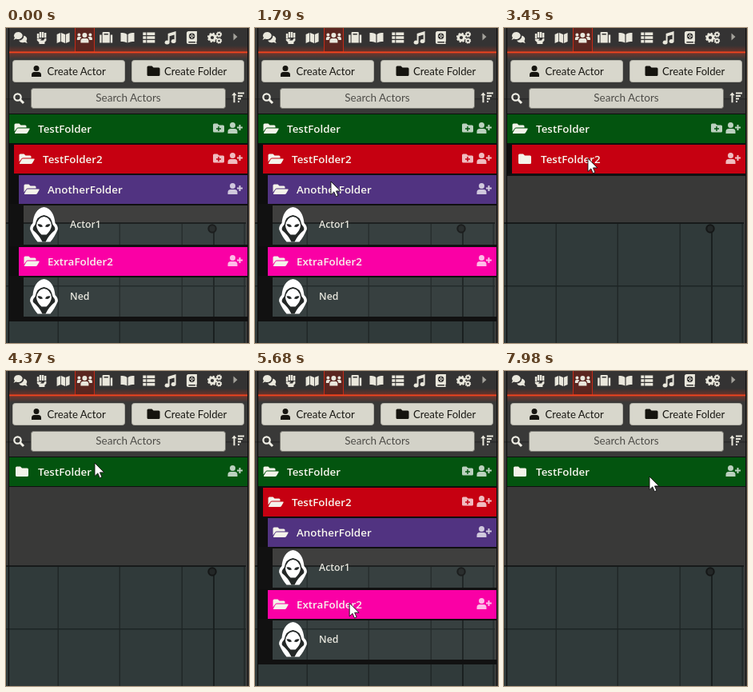
These frames come from a looping animation (304x394 px, 8 s). An HTML page:

```html
<!DOCTYPE html>
<html lang="en">
<head>
<meta charset="utf-8">
<title>Folder tree</title>
<style>
html, body { margin: 0; width: 100%; height: 100%; overflow: hidden; background: #383838; }
svg { display: block; width: 304px; height: 394px; }
text { font: 400 13.5px Lato, "Open Sans", sans-serif; fill: #191813; }
.folder { font: 600 13.4px "Open Sans", "Noto Sans", sans-serif; fill: #f7f6ee; }
.actor { font: 600 12.3px "Open Sans", "Noto Sans", sans-serif; fill: #e6e5dc; }
.lit { filter: drop-shadow(0 0 3px #ff2a12); }
path { fill-rule: evenodd; }
</style>
</head>
<body>
<svg viewBox="0 0 304 394">
  <defs>
    <linearGradient id="glow" x2="0" y2="1">
      <stop offset="0" stop-color="#ff3010" stop-opacity="0"/>
      <stop offset=".5" stop-color="#ff3010" stop-opacity=".3"/>
      <stop offset="1" stop-color="#ff3010" stop-opacity="0"/>
    </linearGradient>
  </defs>
  <g id="scene"></g>
  <g id="panel"></g>
  <g id="sort" transform="translate(290 87)" fill="#e9e7dc">
    <path d="M-4.5-6.5l3.2 3.7h-2.2v9h-2v-9h-2.2zM0-6.5h8v2H0zM0-3h6v2H0zM0 .5h4v2H0zM0 4h2v2H0z"/>
  </g>
  <g id="tree"></g>
  <path id="arrow" d="M0 0v16.5l3.8-3.6 2.5 5.8 2.7-1.1-2.5-5.7h5.3z" fill="#fff" stroke="#111" stroke-width=".9"/>
  <g id="hand" fill="#fff" stroke="#111">
    <path d="M-2 2q0-2 2-2t2 2v5.5q3.3-1 3.6 1 3-.5 3 2v5.5q0 2-1.6 4v2h-8.5v-2l-5-7.5q-1.5-2 .8-2.5 1.7 0 3.7 2.5z"/>
    <path d="M2 7.5v4.5M5.6 8.5v4" fill="none"/>
  </g>
</svg>
<script>
const LOOP = 8000;
const $ = id => document.getElementById(id);

const icons = {
  chat: 'M-2.5-7a5.5 4.5 0 1 1-3 8.4L-8.5 3l1.4-3A5.5 4.5 0 0 1-2.5-7zM4.3-2.5a5 4.3 0 0 1 3.1 6.7L8.7 7 5 5.8A5.5 4.5 0 0 1-2 3.8 7 6 0 0 0 4.3-2.5z',
  fist: 'M-6-5h2.4v6H-6zM-3-7h2.4v7H-3zM0-7h2.4v7H0zM3-6h2.6v6H3zM-6 1.5H0l-2 2h4l2-2.7h1.6v3l-2 2V8h-7V6L-6 3.5z',
  map: 'M-8-4l4.6-2V5L-8 7zM-2.6-6l5 2V7l-5-2zM3.2-4L8-6V5L3.2 7z',
  users: 'M-3-3a3 3 0 1 1 6 0a3 3 0 1 1-6 0zM-5 6.5V4q0-3 3-3h4q3 0 3 3v2.5zM-9-3.5a2 2 0 1 1 4 0a2 2 0 1 1-4 0zM5-3.5a2 2 0 1 1 4 0a2 2 0 1 1-4 0zM-9.5 3V1q0-2 2-2h2q1 0 1.5.7Q-6 1-6 3zM9.5 3V1q0-2-2-2h-2Q4.5-1 4-.3 6 1 6 3z',
  bag: 'M-8-3.5h2.4v10H-8zM-4.6-3.5V-6q0-1 1-1h7.2q1 0 1 1v12.5h-9.2zM-2.6-5v1.5h5.2V-5zM5.6-3.5H8v10H5.6z',
  book: 'M-.6-4C-3-6-6-6-8.5-6V5C-5.5 5-3 5-.6 6.6zM.6-4C3-6 6-6 8.5-6V5C5.5 5 3 5 .6 6.6z',
  list: 'M-7.5-6.5h4v3.6h-4zM-2.5-6.5h10v3.6h-10zM-7.5-1.8h4v3.6h-4zM-2.5-1.8h10v3.6h-10zM-7.5 2.9h4v3.6h-4zM-2.5 2.9h10v3.6h-10z',
  music: 'M-3-5L7-8V4.5a3 2.4 0 1 1-2-2.2v-5.8l-6 1.8V6a3 2.4 0 1 1-2-2.2z',
  atlas: 'M-4-8h10.5V4.5L6 5v2l.5 1H-4q-2.5 0-2.5-2.5v-11Q-6.5-8-4-8zM-4 5v1.5h8.5V5zM-3.5-1.7a3.7 3.7 0 1 0 7.4 0a3.7 3.7 0 1 0-7.4 0zM-2.5-2.4h5.4v1.2h-5.4zM-.4-4.5H.8v5.6H-.4z',
  caret: 'M-2.5-4.5L2.5 0l-5 4.5z',
  user: 'M-3.5-3.5a3.5 3.5 0 1 1 7 0a3.5 3.5 0 1 1-7 0zM-6 7V4.5Q-6 1-2.5 1h5Q6 1 6 4.5V7z',
  add: 'M-6.5-3.5a3.5 3.5 0 1 1 7 0a3.5 3.5 0 1 1-7 0zM-9 7V4.5Q-9 1-5.5 1h5Q3 1 3 4.5V7zM5-4h2v2.5h2.5v2H7V3H5V.5H2.5v-2H5z',
  shut: 'M-8-5q0-1.5 1.5-1.5H-2l2 2h6.5q1.5 0 1.5 1.5v7.5Q8 6 6.5 6h-13Q-8 6-8 4.5z',
  open: 'M-9.5-5q0-1.5 1.5-1.5h4.5l2 2h5.5q1.5 0 1.5 1.5v1.5h-10q-1.5 0-2.3 1.3L-9.5 3.5zM-5-.5H9q1 0 .6 1L7 5q-.6 1-1.8 1H-8.5q-1 0-.5-1L-6.3.3Q-5.8-.5-5-.5z',
  nest: 'M-7-4q0-1.5 1.5-1.5h4l2 2h5Q7-3.5 7-2v6q0 1.5-1.5 1.5h-11Q-7 5.5-7 4zM-.7-2v2.3H-3v1.4h2.3V4H.7V1.7H3V.3H.7V-2z'
};
const icon = (name, x, y, fill = '#e9e7dc') =>
  `<path d="${icons[name]}" fill="${fill}" transform="translate(${x} ${y})"/>`;
const rect = (x, y, w, h, fill, more = '') =>
  `<rect x="${x}" y="${y}" width="${w}" height="${h}" fill="${fill}" ${more}/>`;
const label = (s, x, y, more = '') => `<text x="${x}" y="${y}" ${more}>${s}</text>`;
const gear = (x, y, r) => `<g fill="none" stroke="#e9e7dc" transform="translate(${x} ${y})">
  <circle r="${r * .6}" stroke-width="${r * .5}"/>
  <circle r="${r * .88}" stroke-width="${r * .3}" stroke-dasharray="${r * .38} ${r * .311}"/></g>`;

$('scene').innerHTML =
  rect(0, 0, 304, 394, '#393938') + rect(0, 245, 300, 149, '#303a3a') +
  [65, 142, 220, 298].map(x => rect(x - .5, 245, 1.5, 149, '#202727')).join('') +
  rect(0, 322, 300, 1.5, '#1d2424') + rect(0, 88, 304, 1.5, '#2b2b2b') +
  rect(0, 243, 300, 2, '#171a1a') + rect(259, 251, 2, 143, '#1a2020') +
  '<circle cx="258" cy="251" r="4.7" fill="#232727" stroke="#151717" stroke-width="2"/>' +
  rect(3, 0, 1, 394, '#0b0b0b') + rect(302, 0, 1, 394, '#141010');

const tabs = ['chat', 'fist', 'map', 'users', 'bag', 'book', 'list', 'music', 'atlas'];
const button = (x, name, iconX, s) =>
  rect(x + .5, 40.5, 140, 27, '#d8d7cc', 'rx="3" stroke="#b3b2a8"') +
  icon(name, iconX, 54, '#15140f') + label(s, iconX + 13.5, 59, 'style="font-size:13.2px"');
$('panel').innerHTML =
  rect(4, 0, 298, 30, '#343333') + rect(4, 22, 298, 17, 'url(#glow)') +
  rect(86.5, -1, 24, 31, '#5a2620', 'stroke="#c42a17"') + rect(4, 29.5, 298, 1.8, '#f2441f') +
  tabs.map((name, i) => icon(name, 18 + i * 26.8, 12)).join('') +
  gear(258, 12, 6) + gear(266.5, 8, 3.6) + gear(266.5, 16, 3.6) + icon('caret', 287, 11, '#a3a19b') +
  button(8, 'user', 38, 'Create Actor') + button(157, 'shut', 184.5, 'Create Folder') +
  rect(31.5, 75.5, 243, 25, '#d3d2c8', 'rx="3" stroke="#7b7a73"') +
  label('Search Actors', 153, 92, 'text-anchor="middle" style="fill:#4d4c48"') +
  '<g fill="none" stroke="#f0efe6"><circle cx="14.5" cy="86.5" r="4.2" stroke-width="2.2"/>' +
  '<path d="M17.8 89.8l4.2 4.2" stroke-width="3"/></g>';

const hood = y => `<g transform="translate(47.5 ${y})">
  <path fill="#fff" d="M0 1C9 2 13 11 14 21q4 4 3.3 8Q13 39 8 44.500H-8Q-13 39-17.300 29q-.7-4 3.300-8C-13 11-9 2 0 1z"/>
  <path fill="#242827" d="M0 11Q9 12 11 23q4 4 2.500 7Q6 36 2 44.500H-2Q-6 36-13.500 30-15 27-11 23-9 12 0 11z"/>
  <path fill="#fff" d="M0 13Q8 14 9.500 24 9 30 3 35.500H-3Q-9 30-9.500 24-8 14 0 13z"/>
  <path fill="#242827" d="M-8 22.500q5-1 6.500 3-5 1.500-6.500-3zM8 22.500q-5-1-6.500 3 5 1.500 6.500-3z"/></g>`;

function tree(shut) {
  let y = 108, out = '';
  const folder = (name, x, fill, nests) => {
    const closed = name === shut, soft = '#ffffffbb';
    out += rect(4, y - 1, 298, 38, '#0e0e0e') + rect(x, y, 302 - x, 36, fill) +
      icon(closed ? 'shut' : 'open', x + 16, y + 18, '#f4f3ea') +
      label(name, x + 36, y + 23, 'class="folder"') + icon('add', 286.5, y + 17, soft) +
      (nests && !closed ? icon('nest', 266, y + 17, soft) : '');
    y += 38;
    return !closed;
  };
  const actor = name => {
    out += rect(4, y - 2, 18, 54, '#111') + rect(22, y - 1, 280, 1, '#111') +
      rect(22, y, 280, 49, '#ffffff08') + rect(22, y + 49, 280, 3, '#111') +
      hood(y + 1) + label(name, 80, y + 28, 'class="actor"');
    y += 52;
  };
  let end = -1;
  if (folder('TestFolder', 4, '#03540f', true)) {
    end = 1;
    if (folder('TestFolder2', 10, '#c60011', true)) {
      end = 3;
      if (folder('AnotherFolder', 16, '#513381', false)) actor('Actor1');
      folder('ExtraFolder2', 16, '#fa00a5', false);
      actor('Ned');
    }
  }
  return out + rect(4, y - 2, 298, end + 2, '#111');
}

// [time, closed folder]
const states = [[0, ''], [1860, 'AnotherFolder'], [2330, ''], [3000, 'TestFolder2'], [3520, ''],
  [4370, 'TestFolder'], [4920, ''], [7340, 'TestFolder']];
// [start, end, from x, y, control x, y, to x, y]
const moves = [
  [290, 730, 236, 394, 15, 170, 72, 124],
  [1090, 1550, 72, 124, 76, 165, 95, 192],
  [2400, 2800, 95, 192, 100, 175, 105, 163],
  [3780, 3900, 105, 163, 107, 140, 111, 115],
  [4980, 5560, 111, 115, 116, 200, 118, 274],
  [5590, 6040, 118, 274, 108, 353, 302, 396],
  [6650, 7200, 304, 370, 237, 168, 290, 76],
  [7570, 7980, 290, 76, 130, 125, 182, 132]
];

function pointer(t) {
  const m = moves.findLast(m => m[0] <= t);
  if (!m) return [-50, -50];
  const k = Math.min(1, (t - m[0]) / (m[1] - m[0])), u = k * k * (3 - 2 * k), v = 1 - u;
  return [0, 1].map(i => v * v * m[2 + i] + 2 * u * v * m[4 + i] + u * u * m[6 + i]);
}

let shown;
function draw(now) {
  const t = now % LOOP;
  const shut = states.findLast(s => s[0] <= t)[1];
  if (shut !== shown) $('tree').innerHTML = tree(shown = shut);
  const [x, y] = pointer(t);
  const over = x > 278 && x < 300 && y > 72 && y < 102;
  $('sort').classList.toggle('lit', over);
  for (const id of ['arrow', 'hand']) {
    $(id).setAttribute('transform', `translate(${x} ${y})`);
    $(id).setAttribute('visibility', (id === 'hand') === over ? 'visible' : 'hidden');
  }
  requestAnimationFrame(draw);
}
draw(0);
</script>
</body>
</html>
```
